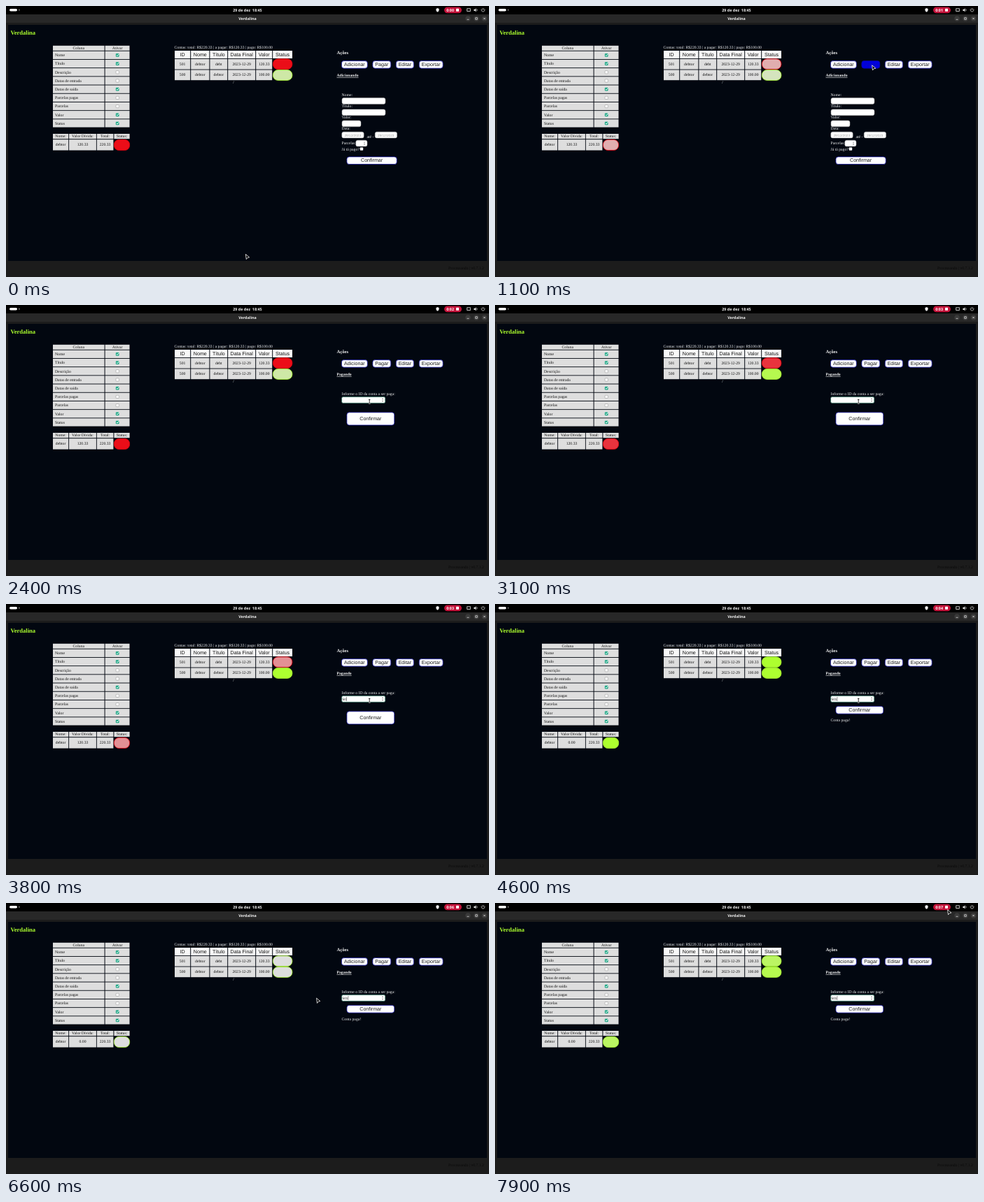
Write an HTML page that moves like this. It is 690x388 px and loops after 8000 ms.

```html
<!DOCTYPE html>
<html lang="pt">
<head>
<meta charset="utf-8">
<title>Verdalina</title>
<style>
html, body { margin: 0; width: 100%; height: 100%; overflow: hidden; background: #1c1c1c; }
svg { display: block; width: 100%; height: 100%; }
text { font: 5.69px "Liberation Serif", serif; text-rendering: geometricPrecision; white-space: pre; }
.sans { font: 7.1px "Liberation Sans", sans-serif; }
.field { font: 4.74px "Liberation Sans", sans-serif; }
.bar { font: bold 5.4px "Noto Sans", sans-serif; }
.bold { font-weight: bold; }
.line { text-decoration: underline; }
.mid { text-anchor: middle; }
</style>
</head>
<body>
<svg id="stage" viewBox="0 0 690 388"></svg>
<script>
const LOOP = 8000, STEP = 100;
const CELL = "#dedede", INK = "#101010", LIGHT = "#f2f2f2";
const GRAY = [222, 222, 222], RED = [236, 2, 14], GREEN = [173, 255, 47];

const rect = (x, y, x2, y2, fill, more = "") =>
  `<rect x="${x}" y="${y}" width="${x2 - x}" height="${y2 - y}" fill="${fill}" ${more}/>`;
const text = (x, y, str, fill = LIGHT, cls = "", more = "") =>
  `<text x="${x}" y="${y}" fill="${fill}" class="${cls}" ${more}>${str}</text>`;
const path = (d, fill, stroke = "none", width = 1) =>
  `<path d="${d}" fill="${fill}" stroke="${stroke}" stroke-width="${width}"/>`;
const cell = (x, y, x2, y2, str, base, cls = "", fill = CELL, more = "") =>
  rect(x, y, x2, y2, fill) + text((x + x2) / 2, base, str, INK, "mid " + cls, more);
const input = (x, y, x2, y2) =>
  rect(x, y, x2, y2, "#fff", 'rx="2.6" stroke="#9a9a9a" stroke-width=".5"');
const button = (x, y, x2, y2, str, id = "") => `<g id="${id}">` +
  rect(x + .4, y + .4, x2 - .4, y2 - .4, "#fff", 'rx="3.4" stroke="#08089a" stroke-width=".75"') +
  text((x + x2) / 2, (y + y2) / 2 + 2.1, str, "#1a1a1a", "sans mid") + "</g>";
const pill = (id, x, y, x2, y2) =>
  rect(x + .4, y + .4, x2 - .4, y2 - .4, "red", `id="${id}" rx="7" stroke-width=".8"`);
const spinner = (x, y) =>
  path(`M${x - 1} ${y - 1}l1 -1.2l1 1.2zM${x - 1} ${y + 1}l1 1.2l1 -1.2z`, "#444");

function desktop() {
  const controls = [660, 672, 683.5].map(x =>
    `<circle cx="${x}" cy="18" r="3.8" fill="#3a3a3a"/>`).join("");
  return rect(0, 0, 690, 388, "#1c1c1c") + rect(0, 12, 690, 24, "#282828") +
    rect(0, 0, 690, 12, "#000") + rect(3, 27, 687, 365, "#020710") +
    rect(5, 4, 16, 7.5, "#fff", 'rx="1.75"') +
    '<circle cx="18.8" cy="5.7" r=".9" fill="#888"/>' +
    text(345, 7.9, "29 de dez  18:45", "#f4f4f4", "bar mid") +
    text(345, 20, "Verdalina", "#f0f0f0", "bar mid") +
    path("M614.4 4l2.1 -.9l2.1 .9v2q0 1.8 -2.1 2.8q-2.1 -1 -2.1 -2.8z", "#eee") +
    rect(626, 1.4, 651, 10.2, "#c4123a", 'rx="4.4"') +
    text(629.2, 7.8, "", "#fff", "bar", 'id="timer"') +
    rect(643, 3.8, 647, 7.8, "#fff", 'rx=".5"') +
    rect(658.7, 3.8, 663.3, 7.4, "none", 'stroke="#eee" stroke-width=".8"') +
    path("M668.3 4.9h1.3l1.7 -1.6v5l-1.7 -1.6h-1.3z", "#eee") +
    path("M672.4 4.2q1.3 1.6 0 3.2M680 4a2.3 2.3 0 1 0 3 0M681.5 3v2.6", "none", "#eee", .7) +
    controls + path("M658.6 19.3h2.8M670.7 16.7h2.6v2.6h-2.6zM682.3 16.8l2.4 2.4M684.7 16.8l-2.4 2.4",
      "none", "#eee", .7) +
    text(632, 377, "Processando | v0.7.1.2", "#0a0a0a");
}

function columnTable() {
  const names = ["Nome", "Título", "Descrição", "Datas de entrada", "Datas de saída",
    "Parcelas pagas", "Parcelas", "Valor", "Status"];
  const on = [0, 1, 4, 7, 8];
  return cell(67, 56.8, 140.6, 63.8, "Coluna", 61.9) + cell(141.6, 56.8, 176.5, 63.8, "Ativar", 61.9) +
    names.map((name, i) => {
      const y = 64.7 + i * 12.2, checked = on.includes(i);
      return rect(67, y, 140.6, y + 11.3, CELL) + rect(141.6, y, 176.5, y + 11.3, CELL) +
        text(70, y + 7.4, name, INK) +
        rect(157.1, y + 3.6, 161.3, y + 7.8, checked ? "#1ba784" : "#fff",
          `rx=".7" stroke="${checked ? "#1ba784" : "#8c8c8c"}" stroke-width=".5"`) +
        (checked ? path(`M157.9 ${y + 5.6}l1.1 1.2l2.4 -2.8`, "none", "#fff", 1) : "");
    }).join("");
}

function debtorTable() {
  const xs = [67, 90.1, 129.8, 154.4], ends = [89.2, 128.9, 153.4, 176.6];
  const heads = ["Nome:", "Valor Dívida:", "Total:", "Status:"];
  const row = ["debtor", "120.33", "220.33"];
  return heads.map((s, i) => cell(xs[i], 183, ends[i], 190.2, s, 188.2)).join("") +
    row.map((s, i) => cell(xs[i], 191.2, ends[i], 206.6, s, 200.2, "", CELL,
      i === 1 ? 'id="debt"' : "")).join("") + pill("debtorPill", 154, 191, 177, 207);
}

function billTable() {
  const xs = [241, 264.2, 291.4, 317.2, 357.2, 381.2], ends = [263.2, 290.4, 316.2, 356.2, 380.2, 409];
  const heads = ["ID", "Nome", "Título", "Data Final", "Valor", "Status"];
  const rows = [["501", "debtor", "debt", "2023-12-29", "120.33"],
    ["500", "debtor", "debtor", "2023-12-29", "100.00"]];
  return text(240.5, 60.8, "Contas: total: R$220.33 | a pagar: R$120.33 | pago: R$100.00") +
    heads.map((s, i) => cell(xs[i], 64, ends[i], 75, s, 71.7, "sans", "#f8f8f8")).join("") +
    rows.map((row, r) => row.map((s, i) =>
      cell(xs[i], 75.9 + r * 15.6, ends[i], 90.6 + r * 15.6, s, 84.7 + r * 15.6)).join("")).join("") +
    pill("newPill", 381, 75.4, 409.3, 91) + pill("oldPill", 381, 91.2, 409.3, 106.8) +
    text(324.2, 111, "/");
}

function addForm() {
  const date = x => input(x, 180.2, x + 31.4, 189) +
    text(x + 15.5, 186.5, "29/12/2023", "#a0a0a0", "field mid");
  return '<g id="addForm">' + text(472.5, 101.3, "Adicionando", LIGHT, "bold line") +
    text(479.5, 128.6, "Nome:") + input(480, 131.6, 542, 140.4) +
    text(479.5, 144.8, "Título:") + input(480, 147.9, 542, 156.7) +
    text(479.5, 161, "Valor:") + input(480, 164, 507, 172.8) +
    text(479.5, 177.2, "Data:") + date(479.8) + text(515.5, 188.6, "até -") + date(527.2) +
    text(479.5, 198, "Parcelas:") + input(499.8, 192.2, 516, 201) + spinner(512, 196.6) +
    text(479.5, 207.3, "Já tá pago?") + rect(505.8, 202.5, 510.2, 206.7, "#fff", 'rx=".7"') +
    button(486.5, 215.5, 558.7, 227, "Confirmar") + "</g>";
}

function payForm() {
  return '<g id="payForm">' + text(472.5, 101.3, "Pagando", LIGHT, "bold line") +
    text(479.5, 128.7, "Informe o ID da conta a ser paga:") +
    rect(479.6, 131.6, 541.8, 140.4, "#fff", 'rx="2" stroke="#2f6f5c" stroke-width=".8"') +
    spinner(538, 136) + text(480.6, 137.8, "", "#222", "field", 'id="typed"') +
    rect(0, 133, .5, 139, "#333", 'id="caret"') +
    button(486.5, 153.4, 555.2, 172.4, "Confirmar", "bigConfirm") +
    '<g id="paidPart">' + button(486.5, 146, 555.2, 157.6, "Confirmar") +
    text(479.5, 167.6, "Conta paga!") + "</g></g>";
}

const stage = document.getElementById("stage");
stage.innerHTML = desktop() + text(6.4, 40.9, "Verdalina", "#adff2f", "bold", 'style="font-size:8.54px"') +
  columnTable() + debtorTable() + billTable() +
  text(472.5, 68.6, "Ações", LIGHT, "bold", 'style="font-size:6.66px"') +
  button(479, 78.2, 516.8, 89.6, "Adicionar") + button(523.4, 78.2, 550.2, 89.6, "Pagar", "pay") +
  button(556.8, 78.2, 583, 89.6, "Editar") + button(589.8, 78.2, 624.6, 89.6, "Exportar") +
  addForm() + payForm() +
  '<g id="arrow">' + path("M0 0L5.2 4.4L2.7 4.9L.9 7.2Z", "#000", "#fff", .8) + "</g>" +
  '<g id="beam">' + path("M-1.2 -2.8h2.4M0 -2.8v5.6M-1.2 2.8h2.4", "none", "#fff", 1.6) +
  path("M-1.2 -2.8h2.4M0 -2.8v5.6M-1.2 2.8h2.4", "none", "#000", .8) + "</g>";

const el = id => document.getElementById(id);
const show = (id, on) => el(id).setAttribute("display", on ? "inline" : "none");

// start, end, then the point reached
const moves = [[0, 0, 342.4, 355.4], [200, 900, 538.6, 84.8], [1600, 2200, 519.2, 138.3],
  [5700, 6300, 443.6, 136.2], [7200, 7800, 646.6, 9.6]];
function pointer(t) {
  let [, , x, y] = moves[0];
  for (const [a, b, nx, ny] of moves.slice(1)) {
    if (t <= a) break;
    const p = Math.min(1, (t - a) / (b - a)), e = p * p * (3 - 2 * p);
    x += (nx - x) * e;
    y += (ny - y) * e;
  }
  return [x, y];
}

// the CSS "ease" curve, solved by bisection
function ease(p) {
  const bezier = (a, b, s) => 3 * a * s * (1 - s) ** 2 + 3 * b * s * s * (1 - s) + s ** 3;
  let lo = 0, hi = 1;
  for (let i = 0; i < 20; i++) {
    const s = (lo + hi) / 2;
    if (bezier(.25, .25, s) < p) lo = s; else hi = s;
  }
  return bezier(.1, 1, lo);
}

// base colour to gray and back, each half eased
function blink(id, base, t, start) {
  const p = (t - start + 800) % 800 / 400;
  const k = p < 1 ? ease(p) : 1 - ease(p - 1);
  const mix = base.map((c, i) => Math.round(c + (GRAY[i] - c) * k));
  el(id).setAttribute("fill", `rgb(${mix})`);
  el(id).setAttribute("stroke", `rgb(${base})`);
}

function draw(t) {
  const [x, y] = pointer(t);
  const paying = t >= 1300, paid = t >= 4400;
  el("timer").textContent = "0:0" + Math.floor(t / 1000);

  blink("oldPill", GREEN, t, 640);
  for (const id of ["newPill", "debtorPill"]) blink(id, paid ? GREEN : RED, t, paid ? 620 : 110);
  el("debt").textContent = paid ? "0.00" : "120.33";

  const hover = x > 523 && x < 550 && y > 78 && y < 90;
  const [box, label] = el("pay").children;
  box.setAttribute("fill", hover ? "#0000e0" : "#fff");
  label.setAttribute("fill", hover ? "#0a0ab4" : "#1a1a1a");

  show("addForm", !paying);
  show("payForm", paying);
  show("bigConfirm", !paid);
  show("paidPart", paid);
  const count = [3500, 3700, 4000].filter(k => t >= k).length;
  el("typed").textContent = "501".slice(0, count);
  el("caret").setAttribute("x", 480.8 + count * 2.64);
  show("caret", count > 0);

  const beam = paying && x > 480 && x < 541 && y > 131 && y < 141;
  show("arrow", !beam);
  show("beam", beam);
  for (const id of ["arrow", "beam"]) el(id).setAttribute("transform", `translate(${x} ${y})`);
}

const began = performance.now();
function tick() {
  const t = (performance.now() - began) % LOOP;
  draw(Math.floor(t / STEP) * STEP);
  requestAnimationFrame(tick);
}
tick();
</script>
</body>
</html>
```
